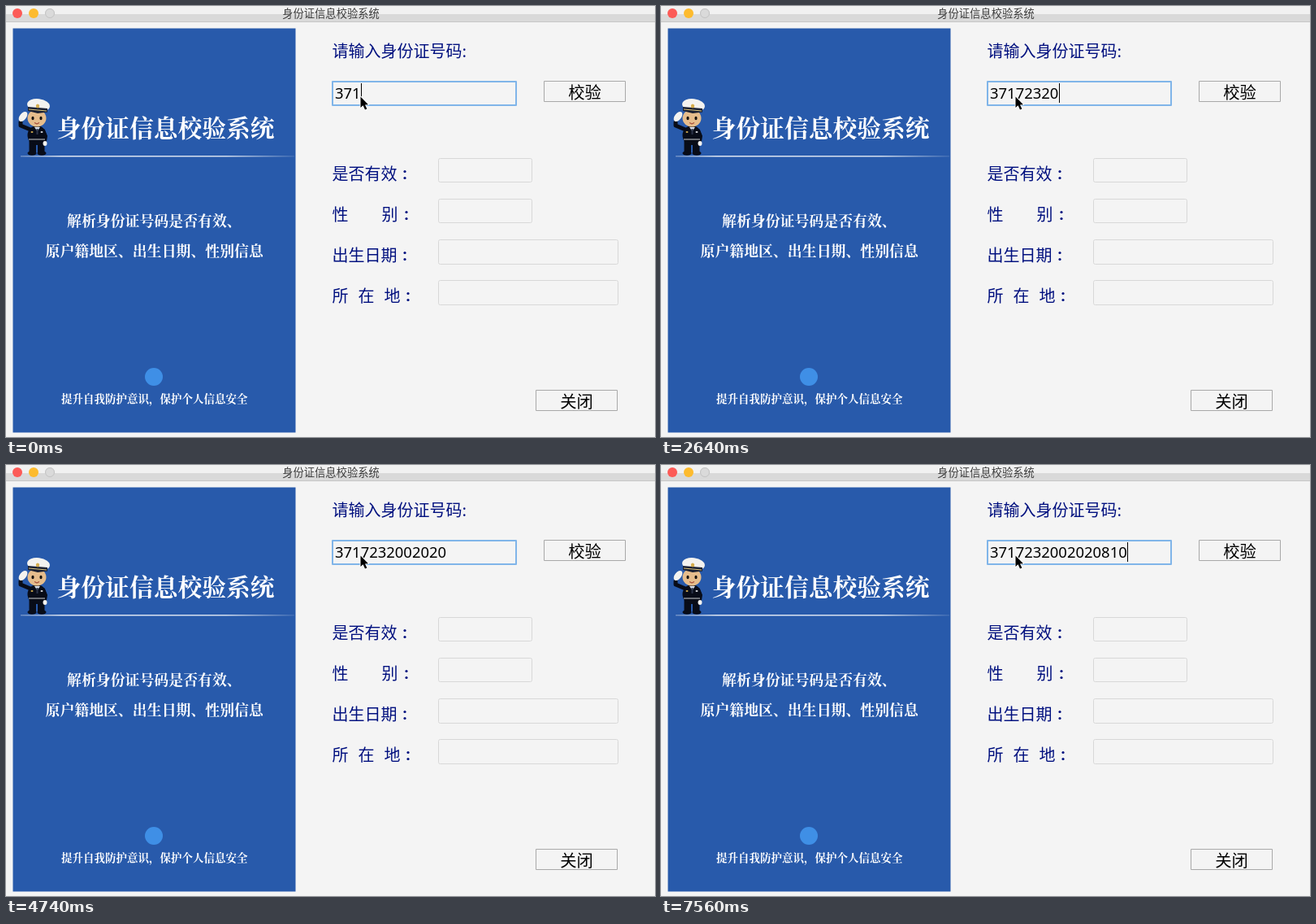
Animation, 799 px wide and 530 px high, one loop 8 s. Source, as an HTML page with a canvas:

```html
<!DOCTYPE html>
<html lang="zh-CN">
<head>
<meta charset="utf-8">
<title>身份证信息校验系统</title>
<style>
  html, body { margin: 0; width: 100%; height: 100%; overflow: hidden; background: #f4f4f4; }
  canvas { display: block; }
</style>
</head>
<body>
<canvas id="stage" width="799" height="530"></canvas>
<script>
const ctx = document.getElementById('stage').getContext('2d');
const SANS = '"Noto Sans CJK SC", "Noto Sans CJK", sans-serif';
const SERIF = '"Noto Serif CJK SC", "Noto Serif", "Noto Sans CJK SC", serif';
const NAVY = '#00107f';
const LOOP = 8000;

const NUMBER = '3717232002020810';
const START_LENGTH = 3;
const KEY_TIMES = [540, 1320, 1560, 1980, 2640, 3000, 3660, 4200, 4440, 4740, 5220, 6420, 7200];
const BLINK = { period: 900, offset: 60, hidden: 300 };

function rect(x, y, w, h, color) {
  ctx.fillStyle = color;
  ctx.fillRect(x, y, w, h);
}

function ellipse(x, y, rx, ry, color, turn = 0) {
  ctx.fillStyle = color;
  ctx.beginPath();
  ctx.ellipse(x, y, rx, ry, turn, 0, Math.PI * 2);
  ctx.fill();
}

function line(points, color, width) {
  ctx.strokeStyle = color;
  ctx.lineWidth = width;
  ctx.beginPath();
  points.forEach(([x, y]) => ctx.lineTo(x, y));
  ctx.stroke();
}

function polygon(points, color) {
  ctx.fillStyle = color;
  ctx.beginPath();
  points.forEach(([x, y]) => ctx.lineTo(x, y));
  ctx.closePath();
  ctx.fill();
}

function frame(x, y, w, h, color, radius = 0) {
  ctx.strokeStyle = color;
  ctx.lineWidth = 1;
  ctx.beginPath();
  ctx.roundRect(x + 0.5, y + 0.5, w - 1, h - 1, radius);
  ctx.stroke();
}

// Places CJK text by the vertical centre of its em box.
function text(str, x, midY, size, color, { family = SANS, weight = 500, align = 'left' } = {}) {
  ctx.font = `${weight} ${size}px ${family}`;
  ctx.textAlign = align;
  ctx.fillStyle = color;
  ctx.fillText(str, x, midY + size * 0.38);
}

function drawTitleBar() {
  rect(0, 0, 799, 10, '#f1f1f1');
  rect(0, 10, 799, 10, '#d9d9d9');
  rect(0, 19, 799, 1, '#c6c6c6');
  ['#fc5b57', '#fdbb2e', '#dadada'].forEach((color, i) => ellipse(14 + i * 20, 9, 6, 6, color));
  ctx.strokeStyle = '#c3c3c3';
  ctx.lineWidth = 1;
  ctx.beginPath();
  ctx.arc(54, 9, 5.5, 0, Math.PI * 2);
  ctx.stroke();
  text('身份证信息校验系统', 400, 9, 13.3, '#3c3c3c', { align: 'center' });
}

function drawOfficer() {
  const dark = '#080c18', skin = '#e6bd8c', white = '#f4f3f0';
  ellipse(32, 181, 5.5, 2.8, dark);
  ellipse(44, 181, 5.5, 2.8, dark);
  rect(28.5, 166, 8.5, 14, dark);
  rect(39, 166, 8.5, 14, dark);
  ctx.lineCap = 'round';
  line([[30, 152], [18, 147], [18, 143]], dark, 5);
  line([[46, 153], [49, 160], [48, 166]], dark, 4);
  ctx.lineCap = 'butt';
  ellipse(38, 159, 11.5, 12, dark);
  ellipse(48, 169, 2.5, 3, white);
  ellipse(38, 138, 11.5, 10.5, skin);
  ellipse(33, 138, 1.6, 2.2, '#16120f');
  ellipse(43, 138, 1.6, 2.2, '#16120f');
  line([[35, 143.5], [38, 145], [41, 143.5]], '#a34a38', 1.2);
  ellipse(40, 122, 14, 7.8, white, 0.12);
  polygon([[27, 124], [51, 126], [51, 130.5], [39, 132], [27, 129]], '#1a2032');
  line([[28, 127], [50, 129]], '#d9c27a', 1);
  ellipse(39, 123, 2.2, 2.5, '#d5ad4d');
  ellipse(21, 136, 7, 4, white, -0.9);
  polygon([[35, 149], [42, 149], [38.5, 154]], '#d8dfeb');
  line([[38.5, 151], [38.5, 158]], '#2a3348', 2);
  line([[28, 164], [48, 164]], '#8c8f94', 1.5);
  ellipse(44, 155, 1.5, 1, '#d9dce2');
  ellipse(32, 155, 1.5, 1, '#d5ad4d');
}

function drawPanel() {
  rect(8.5, 27.5, 348, 497, '#285aab');
  const glow = ctx.createLinearGradient(18, 0, 355, 0);
  glow.addColorStop(0, 'rgba(255,255,255,.3)');
  glow.addColorStop(0.15, 'rgba(255,255,255,.85)');
  glow.addColorStop(0.75, 'rgba(255,255,255,.8)');
  glow.addColorStop(1, 'rgba(255,255,255,.1)');
  rect(18, 184, 337, 1.5, glow);
  drawOfficer();
  const heavy = { family: SERIF, weight: 900 };
  text('身份证信息校验系统', 62.5, 150, 29.8, '#fff', heavy);
  text('解析身份证号码是否有效、', 75, 264.5, 17.9, '#fff', heavy);
  text('原户籍地区、出生日期、性别信息', 48.5, 301.5, 17.9, '#fff', heavy);
  ellipse(182, 456, 11, 11, '#3f8fe6');
  text('提升自我防护意识，保护个人信息安全', 68, 483, 13.5, '#fff', heavy);
}

function drawButton(label, x, y) {
  frame(x, y, 101, 26, '#a9a9a9');
  text(label, x + 50.5, y + 14, 20.3, '#000', { align: 'center' });
}

function drawLabel(parts, midY, colonX) {
  parts.forEach(([str, x]) => text(str, x, midY, 20, NAVY));
  ellipse(colonX, midY - 2.5, 1.6, 1.6, NAVY);
  ellipse(colonX, midY + 5.5, 1.6, 1.6, NAVY);
}

function drawForm() {
  text('请输入身份证号码:', 401.5, 55.5, 20, NAVY);
  drawLabel([['是否有效', 401.5]], 206, 491);
  drawLabel([['性', 401.5], ['别', 462.5]], 256, 493);
  drawLabel([['出生日期', 401.5]], 306, 491);
  drawLabel([['所', 401.5], ['在', 433.5], ['地', 465.5]], 356, 495);
  frame(532, 187, 116, 30, '#d8d8d8', 2);
  frame(532, 237, 116, 30, '#d8d8d8', 2);
  frame(532, 287, 222, 31, '#d8d8d8', 2);
  frame(532, 337, 222, 31, '#d8d8d8', 2);
  drawButton('校验', 662, 92);
  drawButton('关闭', 652, 472);
}

function drawInput(t) {
  ctx.strokeStyle = '#80b5e9';
  ctx.lineWidth = 2;
  ctx.strokeRect(402, 93, 226, 29);

  const typed = NUMBER.slice(0, START_LENGTH + KEY_TIMES.filter(key => t >= key).length);
  ctx.font = '500 18.45px "Noto Sans", "Open Sans", sans-serif';
  ctx.textAlign = 'left';
  ctx.fillStyle = '#000';
  ctx.fillText(typed, 405, 113.5);

  const phase = (t - BLINK.offset + BLINK.period) % BLINK.period;
  if (phase >= BLINK.hidden) {
    rect(Math.round(405.3 + ctx.measureText(typed).width), 95, 1, 24, '#000');
  }
}

function drawPointer() {
  const shape = [[436.5, 111.5], [436.5, 125], [439.6, 122.2], [442, 127.5],
                 [444.4, 126.4], [442, 121.4], [446, 121.2]];
  ctx.lineJoin = 'round';
  line([...shape, shape[0]], '#fff', 1.8);
  polygon(shape, '#000');
}

function render(now) {
  rect(0, 0, 799, 530, '#f4f4f4');
  drawTitleBar();
  drawPanel();
  drawForm();
  drawInput(now % LOOP);
  drawPointer();
}

const start = performance.now();
function tick() {
  render(performance.now() - start);
  requestAnimationFrame(tick);
}
tick();
</script>
</body>
</html>
```
